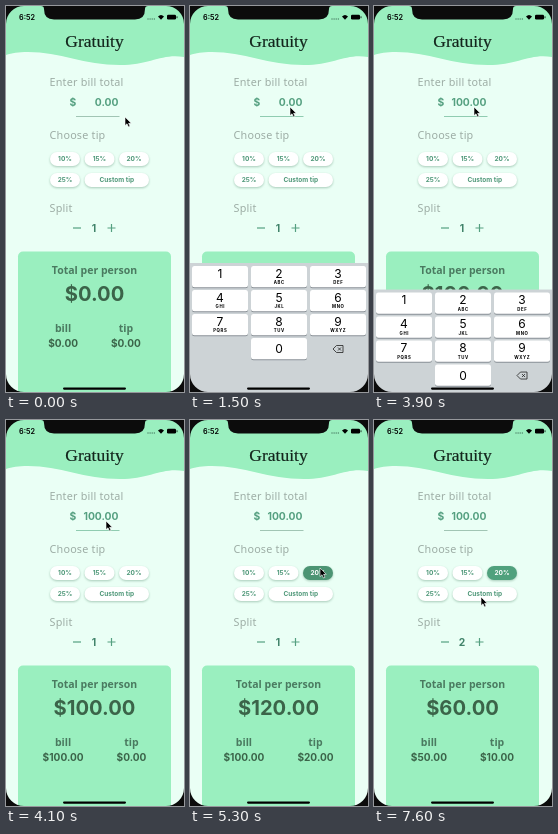
Recreate the animation shown at these times as an HTML page. Size 178x386 px, loop 8 s.

```html
<!DOCTYPE html>
<html lang="en">
<head>
<meta charset="utf-8">
<title>Tip calculator</title>
<style>
  html, body { margin: 0; width: 100%; height: 100%; overflow: hidden; background: #eafff5; }
  svg { display: block; width: 100%; height: 100%; }
  text { font-family: "Noto Sans", sans-serif; font-weight: 700; }
  .title { font: 500 17.5px "Liberation Serif", serif; fill: #13251c; stroke: #13251c; stroke-width: .2px; }
  .label { font-weight: 300; font-size: 10.8px; letter-spacing: .2px; fill: #9dada5; }
  .amount { font: 700 10.3px Inter, sans-serif; fill: #55a080; }
  .mid { text-anchor: middle; }
  .end { text-anchor: end; }
  .card text { text-anchor: middle; fill: #3b6449; }
  .card .caption { font-size: 10.5px; fill: #4a7a60; }
  .card .total { font: 700 20.2px Inter, sans-serif; }
  .card .share { font: 700 10.1px Inter, sans-serif; }
  .pill rect { fill: #fff; filter: drop-shadow(0 1px .8px #79a68f99); }
  .pill text { font: 700 6.5px Inter, sans-serif; fill: #4f9879; text-anchor: middle; }
  .pill.on rect { fill: #50a17d; }
  .pill.on text { fill: #fff; }
  .digit { font: 400 12px Inter, sans-serif; text-anchor: middle; }
  .letters { font: 700 4.3px Inter, sans-serif; letter-spacing: .6px; text-anchor: middle; }
  .time { font: 600 7.3px Inter, sans-serif; }
</style>
</head>
<body>
<svg viewBox="0 0 178 386" preserveAspectRatio="none">
  <rect width="178" height="386" fill="#eafff5"/>
  <path fill="#9aefbf" d="M0 0H178V51C156 47 144 59 114 59C78 59 54 46 22 46C12 46 6 47 0 49Z"/>
  <text class="title mid" x="88.5" y="41">Gratuity</text>

  <text class="label" x="43.5" y="80">Enter bill total</text>
  <text class="amount" x="63.5" y="100.3">$</text>
  <text class="amount end" id="bill" x="112.5" y="100.3"></text>
  <path id="underline" d="M70 110.5H113.5" stroke="#8eb7a4" stroke-width=".8"/>
  <path id="caret" d="M113 91.5V104.5" stroke="#4f94a0"/>

  <text class="label" x="43.5" y="132.5">Choose tip</text>
  <g id="pills"></g>

  <text class="label" x="43.5" y="206">Split</text>
  <path d="M67 222H75" stroke="#55a080" stroke-width="1.2"/>
  <path id="plus" d="M101.5 222H109.5M105.5 218V226" stroke="#55a080" stroke-width="1.2"/>
  <text class="amount mid" id="split" x="88" y="225.7" style="fill:#41836a"></text>

  <g class="card">
    <rect x="12" y="245.5" width="153" height="150" rx="5" fill="#9aefbf"/>
    <text class="caption" x="88.5" y="268">Total per person</text>
    <text class="total" id="total" x="88.5" y="295.3"></text>
    <g id="billColumn">
      <text class="caption" y="326">bill</text>
      <text class="share" id="billShare" y="340.7"></text>
    </g>
    <g id="tipColumn">
      <text class="caption" y="326">tip</text>
      <text class="share" id="tipShare" y="340.7"></text>
    </g>
  </g>

  <g id="keyboard">
    <rect y="257" width="178" height="131" fill="#cdd3d6"/>
    <g id="keys"></g>
    <path d="M143 343L146.5 339.5H153V346.5H146.5ZM148 341.5L151 344.5M151 341.5L148 344.5" fill="none" stroke="#222" stroke-width=".8"/>
  </g>

  <rect x="57" y="381.5" width="63" height="2.2" rx="1.1"/>
  <path fill="#0c0c0c" d="M0 0H178V386H0ZM18 0A18 18 0 0 0 0 18V368A18 18 0 0 0 18 386H160A18 18 0 0 0 178 368V18A18 18 0 0 0 160 0Z" fill-rule="evenodd"/>
  <path fill="#0c0c0c" d="M35 0Q38 0 38 3Q38 13.5 48 13.5H129Q139 13.5 139 3Q139 0 142 0Z"/>
  <text class="time" x="13" y="13.5">6:52</text>
  <path d="M141.5 13H149" stroke="#24493a" stroke-width="1" stroke-dasharray="1 1.1"/>
  <path d="M152 10.5Q155 7.5 158 10.5L155 13.8Z"/>
  <rect x="161" y="8.8" width="9" height="4.8" rx="1.3"/>
  <path d="M171 10.3V12.2" stroke="#000" stroke-width=".8"/>
  <path id="cursor" d="M0 0V8.6L2 6.8L3.5 10L5 9.3L3.6 6.3H6.3Z" stroke="#fff" stroke-width=".6"/>
</svg>
<script>
const LOOP = 8000;
const CARD_CENTER = 88.5, COLUMN_GAP = 33;
const $ = id => document.getElementById(id);
const clamp = v => Math.max(0, Math.min(1, v));
const smooth = v => v * v * (3 - 2 * v);
const progress = (t, start, end) => clamp((t - start) / (end - start));
const between = (t, start, end) => t >= start && t < end;
const moveTo = (id, x, y) => $(id).setAttribute('transform', `translate(${x} ${y})`);

const pillSpecs = [
  ['10%', 44, 146, 30], ['15%', 78.5, 146, 30], ['20%', 113, 146, 30],
  ['25%', 44, 167, 30], ['Custom tip', 78.5, 167, 64.5]
];
$('pills').innerHTML = pillSpecs.map(([label, x, y, w]) =>
  `<g class="pill"><rect x="${x}" y="${y}" width="${w}" height="14" rx="7"/>
   <text x="${x + w / 2}" y="${y + 9.3}">${label}</text></g>`).join('');
const chosenPill = $('pills').children[2];

const letters = ['', 'ABC', 'DEF', 'GHI', 'JKL', 'MNO', 'PQRS', 'TUV', 'WXYZ'];
function key(digit, column, row, caption = '') {
  const x = 2 + column * 59, y = 260 + row * 24;
  const baseline = y + (digit ? 11.5 : 15.3);
  return `<rect x="${x}" y="${y + 1}" width="56" height="21.3" rx="2.5" fill="#899096"/>
    <rect x="${x}" y="${y}" width="56" height="21.3" rx="2.5" fill="#fff"/>
    <text class="digit" x="${x + 28}" y="${baseline}">${digit}</text>
    <text class="letters" x="${x + 28.3}" y="${y + 18}">${caption}</text>`;
}
$('keys').innerHTML = letters.map((caption, i) =>
  key(i + 1, i % 3, Math.floor(i / 3), caption)).join('') + key(0, 1, 3);

// Time, x and y of the pointer tip.
const pointerPath = [
  [0, 119, 111], [200, 119, 111], [400, 100, 101], [4300, 100, 101],
  [4600, 108, 98], [4900, 108, 98], [5000, 119, 146], [5100, 119, 146],
  [5200, 130, 148], [5600, 130, 148], [6500, 102, 219], [7000, 102, 219],
  [7600, 107, 177], [LOOP, 107, 177]
];
function pointerAt(t) {
  const i = pointerPath.findIndex(point => point[0] > t);
  const [t0, x0, y0] = pointerPath[i - 1], [t1, x1, y1] = pointerPath[i];
  const k = smooth(progress(t, t0, t1));
  return [x0 + (x1 - x0) * k, y0 + (y1 - y0) * k];
}

// Each key press shifts the amount one decimal place to the left.
const keyPresses = [1700, 2100, 2400, 2650, 2950];

// The two columns are as wide as their amounts and centred as a pair.
function layOutColumns() {
  const billWidth = $('billShare').getComputedTextLength();
  const tipWidth = $('tipShare').getComputedTextLength();
  moveTo('billColumn', CARD_CENTER - (COLUMN_GAP + tipWidth) / 2, 0);
  moveTo('tipColumn', CARD_CENTER + (COLUMN_GAP + billWidth) / 2, 0);
}

function draw(t) {
  const typed = keyPresses.filter(time => t >= time).length;
  const bill = typed ? 10 ** (typed - 3) : 0;
  const tipped = t >= 5250;
  const split = t >= 6600 ? 2 : 1;
  const tip = tipped ? bill * .2 : 0;
  const money = value => '$' + (value / split).toFixed(2);

  $('bill').textContent = bill.toFixed(2);
  $('split').textContent = split;
  $('total').textContent = money(bill + tip);
  $('billShare').textContent = money(bill);
  $('tipShare').textContent = money(tip);
  layOutColumns();

  chosenPill.classList.toggle('on', tipped);
  chosenPill.firstElementChild.style.fill = between(t, 5250, 5450) ? '#4c9473' : '';
  $('plus').setAttribute('opacity', between(t, 6550, 6750) ? .5 : 1);

  const shown = 1 - (1 - progress(t, 750, 1250)) ** 3;
  const hidden = smooth(progress(t, 3820, 4100));
  moveTo('keyboard', 0, 131 * (1 - shown + hidden));
  $('underline').setAttribute('stroke', between(t, 800, 4700) ? '#79bfa0' : '#8eb7a4');
  $('caret').setAttribute('opacity', between(t, 850, 1450) || between(t, 1700, 3200) ? 1 : 0);
  moveTo('cursor', ...pointerAt(t));
}

function tick() {
  draw(performance.now() % LOOP);
  requestAnimationFrame(tick);
}
tick();
</script>
</body>
</html>
```
